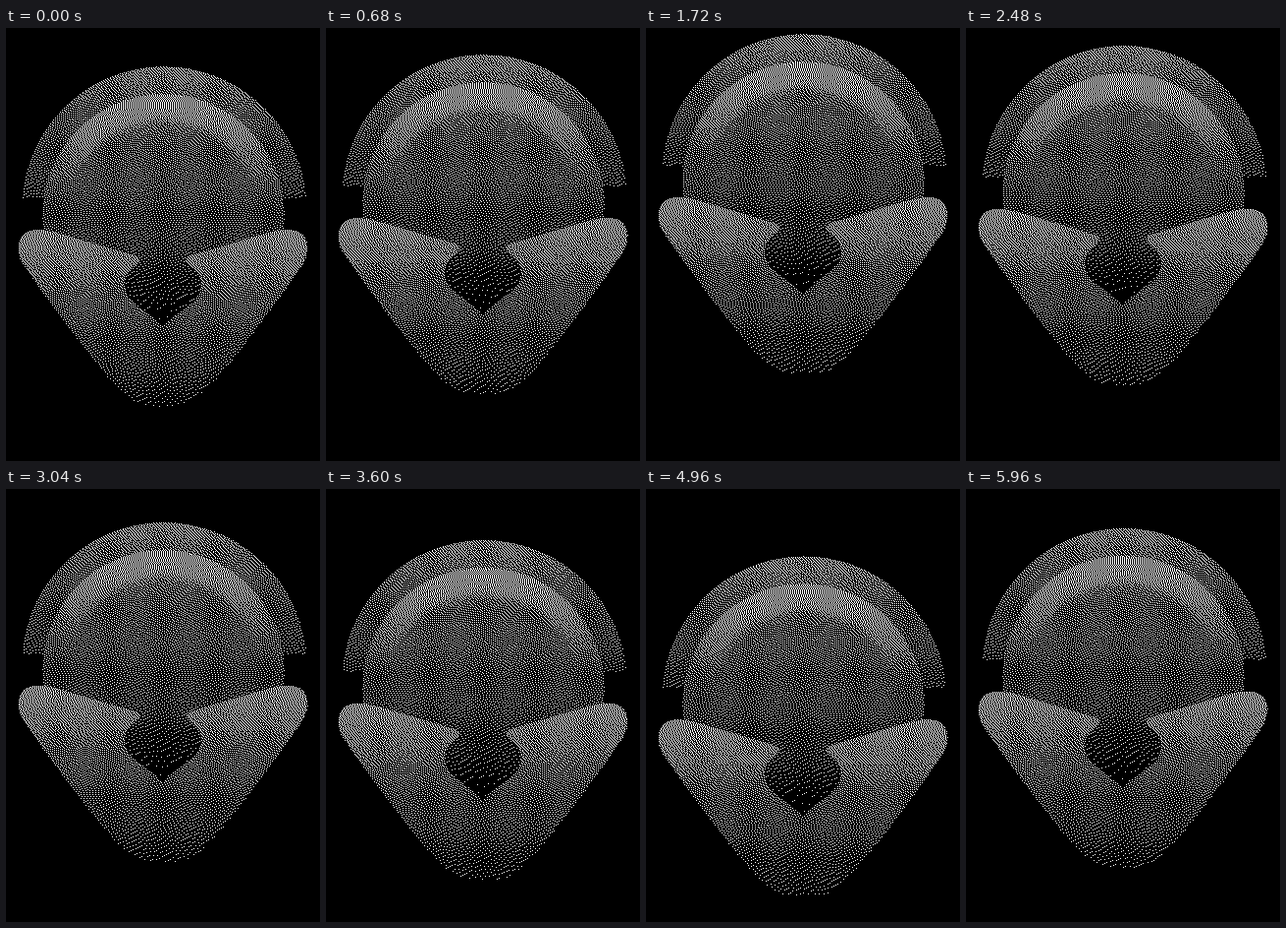
Animation, 320 px wide and 440 px high, one loop 6 s. Source, as an HTML page with a canvas:

```html
<!DOCTYPE html>
<html lang="en">
<head>
<meta charset="utf-8">
<title>Floating stippled head</title>
<style>
  html, body { margin: 0; width: 320px; height: 440px; overflow: hidden; background: #000; }
  canvas { display: block; image-rendering: pixelated; }
</style>
</head>
<body>
<canvas id="stage" width="320" height="440"></canvas>
<script>
const W = 320, H = 440, LOOP = 6000, STEP = 40;
const stage = document.getElementById('stage').getContext('2d');
const shade = Object.assign(document.createElement('canvas'), { width: W, height: H })
  .getContext('2d', { willReadFrequently: true });
const output = stage.createImageData(W, H);
const pixels = new Uint32Array(output.data.buffer);
const BLACK = 0xff000000, WHITE = 0xffffffff;

// Time in ms and height of the topmost edge in px
const drift = [
  [0, 39.2], [640, 28], [1300, 10.8], [1600, 6.4], [1960, 8.3], [2480, 18],
  [3220, 39.6], [3860, 59.3], [4480, 70], [4720, 71.3], [4960, 68.4],
  [5160, 64], [5760, 43.4]
];

function driftKey(i) {
  const n = drift.length, turn = Math.floor(i / n);
  const [t, y] = drift[i - turn * n];
  return [t + turn * LOOP, y];
}

function slopeAt(i) {
  const [t0, y0] = driftKey(i - 1), [t1, y1] = driftKey(i), [t2, y2] = driftKey(i + 1);
  const a = t1 - t0, b = t2 - t1;
  return ((y1 - y0) / a * b + (y2 - y1) / b * a) / (a + b);
}

function topAt(time) {
  let i = drift.length - 1;
  while (drift[i][0] > time) i--;
  const [t0, y0] = driftKey(i), [t1, y1] = driftKey(i + 1);
  const span = t1 - t0, u = (time - t0) / span, v = 1 - u;
  return y0 * (1 + 2 * u) * v * v + y1 * u * u * (3 - 2 * u)
    + span * u * v * (slopeAt(i) * v - slopeAt(i + 1) * u);
}

function verticalTone(stops) {
  const first = stops[0][0], last = stops[stops.length - 1][0];
  const gradient = shade.createLinearGradient(0, first, 0, last);
  for (const [y, tone] of stops) {
    const g = Math.round(tone * 255);
    gradient.addColorStop((y - first) / (last - first), `rgb(${g},${g},${g})`);
  }
  return gradient;
}

function disc(radius) {
  const path = new Path2D();
  path.arc(160.5, 191, radius, 0, Math.PI * 2);
  return path;
}

const halo = new Path2D();
halo.moveTo(15.5, 173);
halo.arc(161, 185, 146, Math.PI + 0.082, -0.082);
halo.closePath();

const head = disc(123.5);
const face = disc(97);

const halfJaw = `C172 384.5 184 384 193 377 C202 371 211 361 219 352
  Q263 298 302 241 C312 226 309 205 288 205 C278 205 268 208 258 211
  L190 231 C183 233 182 237 186 240 C193 246 199 251 199 260
  C199 272 193 277 184 284 C174 291 165 298 160 304`;
const jaw = new Path2D();
const half = new Path2D(`M160 384.5 ${halfJaw} Z`);
jaw.addPath(half);
jaw.addPath(half, new DOMMatrix([-1, 0, 0, 1, 320, 0]));

// The face and the head share their tones below the lit rim
const lowerHead = [[180, .18], [235, .13], [262, .08], [290, .02]];
const haloTone = verticalTone([[39, .36], [70, .28], [120, .19], [173, .1]]);
const headTone = verticalTone([[67, .51], [95, .46], [130, .33], ...lowerHead]);
const faceTone = verticalTone([[94, .28], [130, .23], ...lowerHead]);
const jawTone = verticalTone([[205, .45], [235, .36], [270, .25], [320, .16], [385, .06]]);

function paint(path, tone) {
  shade.fillStyle = tone;
  shade.fill(path);
}

function drawShades(offset) {
  shade.setTransform(1, 0, 0, 1, 0, 0);
  shade.fillStyle = '#000';
  shade.fillRect(0, 0, W, H);
  shade.translate(0, offset);
  paint(halo, haloTone);
  paint(head, headTone);
  shade.filter = 'blur(3px)';
  paint(face, faceTone);
  shade.filter = 'none';
  paint(jaw, jawTone);
}

// Sierra Lite diffusion to pure black and white
function stipple() {
  const { data } = shade.getImageData(0, 0, W, H);
  let row = new Float32Array(W + 2), next = new Float32Array(W + 2);
  for (let y = 0; y < H; y++) {
    for (let x = 0; x < W; x++) {
      const i = y * W + x, value = data[i * 4] + row[x + 1];
      const lit = value >= 128;
      const error = (lit ? value - 255 : value) / 4;
      pixels[i] = lit ? WHITE : BLACK;
      row[x + 2] += error * 2;
      next[x] += error;
      next[x + 1] += error;
    }
    [row, next] = [next, row];
    next.fill(0);
  }
  stage.putImageData(output, 0, 0);
}

let shown = -1;
const start = performance.now();

function frame() {
  const time = Math.floor((performance.now() - start) % LOOP / STEP) * STEP;
  if (time !== shown) {
    shown = time;
    drawShades(topAt(time) - drift[0][1]);
    stipple();
  }
  requestAnimationFrame(frame);
}
frame();
</script>
</body>
</html>
```
